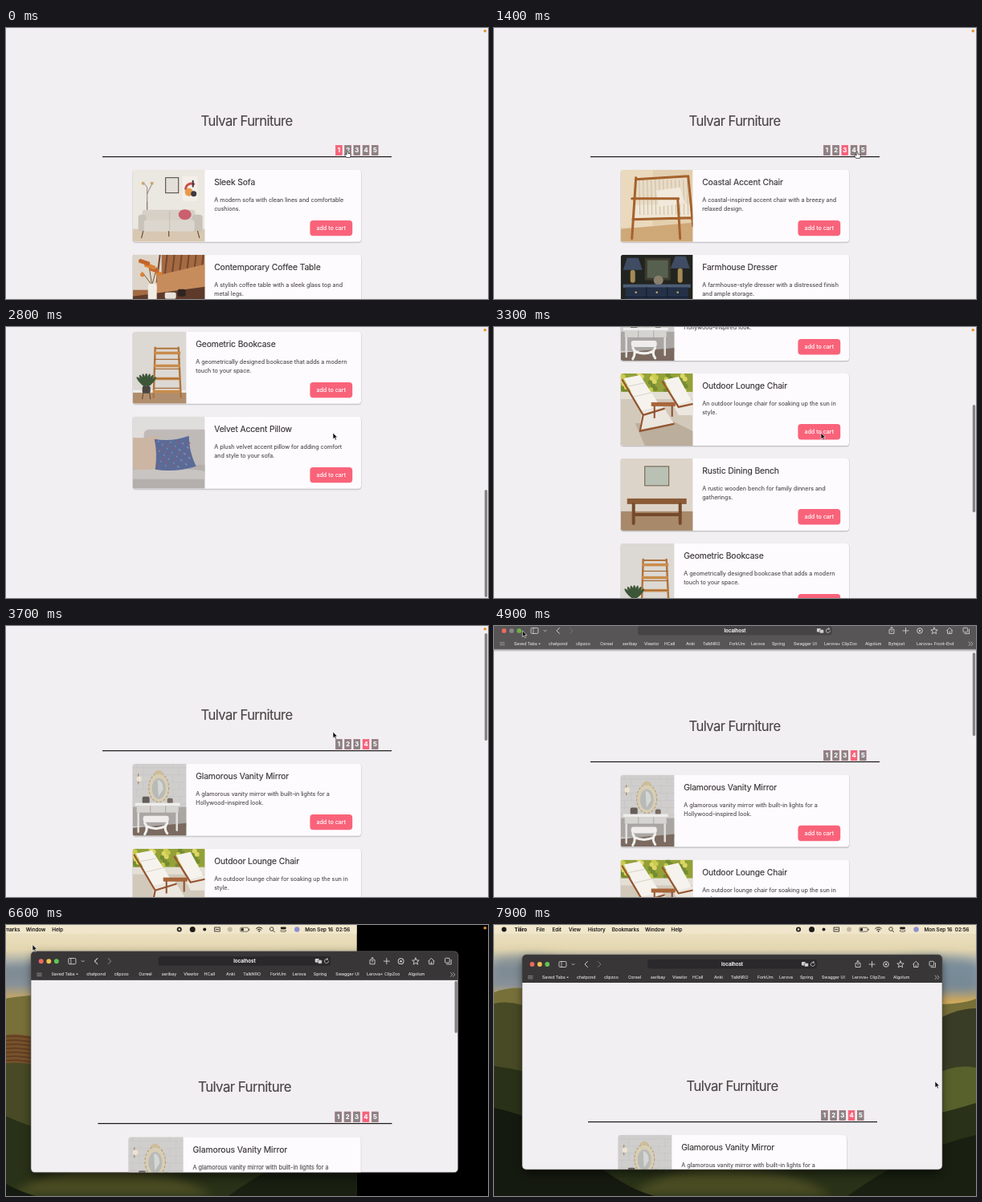
Animation of 600 by 338 pixels, one loop 8 s. Source, as an HTML page:

```html
<!DOCTYPE html>
<html lang="en">
<head>
<meta charset="utf-8">
<title>Furniture shop</title>
<style>
html, body { margin: 0; width: 100%; height: 100%; overflow: hidden; background: #000; }
svg { display: block; width: 100%; height: 100%; font-family: Inter, Roboto, "Open Sans", sans-serif; }
</style>
</head>
<body>
<svg id="stage" viewBox="0 0 600 338"></svg>
<script>
const LOOP = 8000;

const rect = (x, y, w, h, fill, more = '') =>
  `<rect x="${x}" y="${y}" width="${w}" height="${h}" fill="${fill}" ${more}/>`;
const disc = (x, y, r, fill, more = '') => `<circle cx="${x}" cy="${y}" r="${r}" fill="${fill}" ${more}/>`;
const oval = (x, y, rx, ry, fill, more = '') =>
  `<ellipse cx="${x}" cy="${y}" rx="${rx}" ry="${ry}" fill="${fill}" ${more}/>`;
const shape = (d, fill, more = '') => `<path d="${d}" fill="${fill}" ${more}/>`;
const line = (d, color, width = 1) =>
  `<path d="${d}" fill="none" stroke="${color}" stroke-width="${width}" stroke-linecap="round" stroke-linejoin="round"/>`;
// A hairline stroke gives the text its slightly heavy rendering
const text = (x, y, size, str, fill, more = '') =>
  `<text x="${x}" y="${y}" font-size="${size}" fill="${fill}" stroke="${fill}" stroke-width=".14" ${more}>${str}</text>`;
const group = (inner, more = '') => `<g ${more}>${inner}</g>`;
const at = (x, y, inner) => group(inner, `transform="translate(${x} ${y})"`);
const repeat = (n, fn) => Array.from({ length: n }, (_, i) => fn(i)).join('');

// Product pictures, drawn in a 90 (or 67) by 90 box
const art = {
  sofa: () => rect(0, 0, 90, 90, '#ebe7e1') + rect(0, 74, 90, 16, '#d8c8b2') +
    rect(41, 10, 16, 19, '#e4dfd8', 'stroke="#45403d"') +
    rect(62, 8, 19, 31, '#f4efe8') + line('M66 24a7 7 0 0 1 10-6', '#c9524f', 3) +
    disc(70, 28, 5, '#e59a4b') + disc(76, 30, 3.5, '#3d3a41') + line('M75 14v7', '#3d3a41', 2) +
    line('M18 74V22l-4-5M18 30l7-14M18 74V40', '#7a6d60', .8) + disc(13, 17, 2, '#c9a870') + disc(24, 17, 2, '#c9a870') +
    rect(12, 50, 66, 18, '#d6d0c6', 'rx="4"') + rect(7, 56, 10, 21, '#c8c2b8', 'rx="4"') +
    rect(74, 56, 13, 21, '#c8c2b8', 'rx="4"') + rect(14, 63, 63, 14, '#dcd7ce', 'rx="3"') +
    line('M46 52v23', '#bbb4aa', .7) + oval(65, 56, 8, 6.5, '#cc5f6d') +
    line('M13 77l-2 8M81 77l2 8M45 77v6', '#6b4d36', 1.2),
  coffee: () => rect(0, 0, 90, 90, '#a36a43') + rect(0, 0, 36, 44, '#ddd5ca') +
    repeat(7, i => line(`M${34 + i * 9} 0l-4 34`, '#774629', 2)) + shape('M30 26L90 12V42L30 48z', '#c78c5c') +
    shape('M0 52L90 40V90H0z', '#5d3a2a') + line('M24 38L20 12M24 38l6-22M24 38l-12-16', '#7b5a32', 1) +
    repeat(14, i => disc(10 + i * 7 % 25, 8 + i * 5 % 19, 2.6, i % 2 ? '#d98235' : '#c4652a')) +
    rect(19, 36, 11, 22, '#f0ece6', 'rx="4"') + rect(40, 47, 14, 8, '#e8e2da', 'rx="2"') +
    rect(56, 43, 10, 9, '#2e2422', 'rx="2"'),
  chair: () => rect(0, 0, 90, 90, '#e3cfaf') + rect(0, 0, 40, 72, '#ead9bd') + shape('M0 74L90 66V90H0z', '#cfa878') +
    shape('M20 14L84 10 86 50 24 52z', '#e8dcc8') + shape('M18 44L86 42 88 58 18 60z', '#efe6d6') +
    repeat(13, i => line(`M${23 + i * 5} 13l1 43`, '#c7b493', .8)) + shape('M44 26l30-4 6 20-32 4z', '#f1e9db') +
    line('M14 86L19 10M14 36H72M71 36L74 86M15 62L90 60M19 12L84 8M84 8L90 70', '#a5622d', 3),
  dresser: () => rect(0, 0, 90, 90, '#22241f') + rect(30, 4, 32, 28, '#3c3a2e') + rect(33, 7, 26, 22, '#57604f') +
    shape('M8 4h14l5 15H3zM68 2h13l5 15H62z', '#3f4c63') + rect(12, 19, 6, 16, '#a58a55', 'rx="3"') +
    rect(71, 17, 6, 18, '#a58a55', 'rx="3"') + disc(47, 32, 6, '#8a7e6c') + rect(3, 37, 84, 4, '#4d5d78') +
    rect(6, 41, 78, 49, '#243147') + line('M6 53H84M32 41v12M58 41v12', '#121a2a', 1) +
    [19, 45, 71].map(x => disc(x, 47, 1.3, '#c4a767')).join(''),
  mirror: () => rect(0, 0, 67, 90, '#cfcecd') + rect(0, 54, 67, 24, '#aaa6a3') + shape('M0 80L67 74V90H0z', '#7b6a60') +
    repeat(6, i => line(`M0 ${5 + i * 9}H67M${5 + i % 2 * 8} ${5 + i * 9}v-9M${50 + i % 2 * 8} ${5 + i * 9}v-9`, '#c3c1c0', .5)) +
    oval(32.5, 30, 12.5, 18, '#d8cdb4') + oval(32.5, 30, 12.5, 18, 'none', 'stroke="#b3a27c" stroke-width="1.2" stroke-dasharray="3 2"') +
    oval(32.5, 31, 8.5, 13, '#b8bab7') + shape('M31 20q7 2 7 12l-6 9z', '#d5d7d5') + shape('M26 13q6-10 13 0z', '#cdbd98') +
    line('M7 13v12', '#a5865c', 1.2) + disc(8, 19, 3.2, '#eee3d0') +
    rect(12, 41, 9, 9, '#655d58', 'rx="2"') + rect(43, 43, 7, 7, '#776a61', 'rx="2"') +
    rect(3, 49, 56, 3.5, '#eeedec') + rect(5, 52.5, 52, 9, '#d6d4d1') +
    line('M22 53v8M41 53v8M5 61.5H57', '#9c9895', .7) + line('M7 62v23M55 62v21', '#e3e1de', 2.5) +
    rect(13, 65, 32, 8, '#eeedeb', 'rx="3"') + line('M15 74q5 6 0 14M43 74q-5 6 0 13M17 78q12 6 24 0', '#f1f0ee', 3),
  lounge: () => rect(0, 0, 90, 90, '#d2c9bb') + rect(0, 0, 90, 24, '#93a138') +
    repeat(40, i => disc(i * 37 % 92, i * 11 % 23, 3, ['#c9cb4c', '#748c30', '#dcd566'][i % 3])) +
    rect(0, 23, 90, 9, '#e4dfd5') + shape('M18 62L66 60 90 72V90H30z', '#bcae9c') +
    shape('M4 6L24 2 50 42 26 48z', '#f6f3ee') + shape('M26 46L52 40 66 62 24 70z', '#ebe6de') +
    line('M10 16L29 12M17 29L38 24', '#cfc8be', .8) +
    shape('M54 8L72 4 88 34 72 40z', '#f6f3ee') + shape('M66 40L90 33V52L72 52z', '#ebe6de') +
    line('M2 8L28 52 24 72 66 63M28 52L54 44M52 10L72 42 90 38', '#95552f', 2.2) +
    rect(38, 36, 30, 5, '#a8653a') + line('M42 41v14M64 41v12', '#8d4e2b', 2),
  bench: () => rect(0, 0, 90, 90, '#ddd4c9') + rect(0, 66, 90, 24, '#a88a6b') + rect(30, 10, 30, 24, '#b9c0b4', 'stroke="#6e5c4a"') +
    rect(8, 50, 74, 7, '#8a5b36') + line('M16 57v24M74 57v24M16 70H74', '#754a2b', 4),
  bookcase: () => rect(0, 0, 67, 90, '#dcd8d4') + rect(0, 76, 67, 14, '#b08e6d') + rect(0, 73, 67, 3, '#efedea') +
    line('M28 20L26 82M57 20L60 82', '#b0743b', 2.4) + line('M28 21H57', '#b0743b', 2) +
    repeat(4, i => rect(26.5 - i * .4, 25 + i * 16, 33, 3.5, '#c98c4a') + rect(27, 34 + i * 12, 32, 1.2, '#a76a35')) +
    repeat(7, i => oval(17, 60, 2, 8, '#3d5638', `transform="rotate(${-42 + i * 14} 17 70)"`)) +
    rect(12, 68, 10, 9, '#4a4541', 'rx="2"') + line('M13 77l-1 7M21 77l1 7', '#6e4f35', 1.2),
  pillow: () => rect(0, 0, 90, 90, '#e0dedd') + rect(14, 16, 80, 54, '#bfbab8', 'rx="6"') + rect(0, 60, 90, 30, '#b4afad') +
    shape('M0 66Q50 62 90 68V78H0z', '#c8c4c1') + shape('M0 26Q18 28 32 23Q29 44 36 64Q16 68 0 65z', '#cdb5a4') +
    shape('M27 28Q48 32 70 24Q70 44 79 62Q54 70 28 66Q31 46 27 28z', '#596b98') +
    repeat(90, i => disc(32 + i * 13 % 41, 31 + i * 7 % 34, .9, i % 3 ? '#8a5d74' : '#7e8fb4')),
  lamp: () => rect(0, 0, 67, 90, '#cfcac4') + rect(0, 74, 67, 16, '#8b6d54') +
    shape('M24 14h20l5 16H19z', '#3b3836') + line('M34 30V78M24 80H44', '#3b3836', 2.4)
};

const wide = 90, tall = 67;
const pages = {
  1: [['Sleek Sofa', 'A modern sofa with clean lines and comfortable', 'cushions.', 'sofa', wide],
    ['Contemporary Coffee Table', 'A stylish coffee table with a sleek glass top and', 'metal legs.', 'coffee', wide]],
  2: [['Minimalist Bookshelf', 'A minimalist bookshelf with open shelves for', 'your favorite books.', 'bookcase', tall],
    ['Industrial Floor Lamp', 'An industrial floor lamp with a metal shade and', 'adjustable height.', 'lamp', tall]],
  3: [['Coastal Accent Chair', 'A coastal-inspired accent chair with a breezy and', 'relaxed design.', 'chair', wide],
    ['Farmhouse Dresser', 'A farmhouse-style dresser with a distressed finish', 'and ample storage.', 'dresser', wide]],
  4: [['Glamorous Vanity Mirror', 'A glamorous vanity mirror with built-in lights for a', 'Hollywood-inspired look.', 'mirror', tall],
    ['Outdoor Lounge Chair', 'An outdoor lounge chair for soaking up the sun in', 'style.', 'lounge', wide],
    ['Rustic Dining Bench', 'A rustic wooden bench for family dinners and', 'gatherings.', 'bench', wide],
    ['Geometric Bookcase', 'A geometrically designed bookcase that adds a modern', 'touch to your space.', 'bookcase', tall],
    ['Velvet Accent Pillow', 'A plush velvet accent pillow for adding comfort', 'and style to your sofa.', 'pillow', wide]]
};

function card([name, first, second, picture, width], i) {
  const x = width + 11.5;
  return at(157.7, 176.7 + i * 106,
    rect(-.6, .2, 285.5, 91.6, '#000', 'rx="4" opacity=".09"') + rect(-.2, .1, 284.7, 90.8, '#000', 'rx="4" opacity=".16"') +
    rect(0, 0, 284.3, 90, '#fdfbfe', 'rx="3.5"') + group(art[picture](), `clip-path="url(#photo${width})"`) +
    text(x, 19.1, 10.3, name, '#383334', 'letter-spacing="-.1"') +
    text(x, 40.1, 7.15, first, '#565152') + text(x, 51.2, 7.15, second, '#565152') +
    rect(220.7, 63.2, 52.8, 19.4, '#f9637a', 'rx="4"') +
    text(247, 75.6, 7.15, 'add to cart', '#fff', 'text-anchor="middle"'));
}

function page(n) {
  const pager = repeat(5, i => rect(410.5 + i * 11.22, 146.5, 7.7, 12, i + 1 === n ? '#f9637a' : '#898486',
    `stroke="${i + 1 === n ? '#f2566f' : '#a0666f'}" stroke-width=".7"`) +
    text(414.4 + i * 11.22, 155.3, 7.7, i + 1, '#fff', 'text-anchor="middle" font-weight="700"'));
  return text(299.6, 122.4, 16.6, 'Tulvar Furniture', '#4c4546', 'text-anchor="middle" letter-spacing="-.57"') +
    pager + rect(120, 160, 360, 1.2, '#1c1819') + pages[n].map(card).join('');
}

function menuBar(color, hollow) {
  const items = [['Tiliro', 25.5], ['File', 52.6], ['Edit', 72.5], ['View', 93], ['History', 117], ['Bookmarks', 146.7], ['Window', 188], ['Help', 220.5]];
  return disc(12.5, 5.6, 3, color) +
    items.map(([s, x], i) => text(x, 8, 6.3, s, color, `font-weight="${i ? 500 : 700}"`)).join('') +
    disc(379, 5.5, 3, color) + rect(377.8, 4.3, 2.4, 2.4, hollow) +
    disc(395.5, 5.5, 3.5, color) + disc(410.5, 5.5, 2, color) +
    rect(423, 3, 6.5, 5, 'none', `stroke="${color}" stroke-width=".8"`) + line('M424.5 5.5h3.5', color, .8) +
    disc(442, 5.5, 3, color, 'opacity=".22"') +
    rect(455, 3.2, 10, 5, 'none', `rx="1.3" stroke="${color}" stroke-width=".6"`) + rect(456, 4.2, 3, 3, color) + rect(465.7, 4.7, .8, 2, color) +
    line('M474.8 4.3q3.7-3 7.4 0M476.2 6q2.3-1.8 4.6 0', color, 1) + disc(478.5, 7.7, .9, color) +
    disc(494, 5, 2.3, 'none', `stroke="${color}" stroke-width=".8"`) + line('M495.7 6.8l2 2', color, .8) +
    rect(505, 2.5, 7, 2.6, color, 'rx="1.3"') + rect(505.3, 6, 6.4, 2.3, 'none', `rx="1.2" stroke="${color}" stroke-width=".6"`) +
    disc(525.5, 5.5, 3.2, '#8d8fd0') +
    text(591.5, 8, 6.3, 'Mon Sep 16&#160; 02:56', color, 'text-anchor="end" font-weight="500"');
}

const bookmarks = [['Saved Tabs ▪', 25], ['chatpond', 68], ['clipzoo', 102], ['Ozreel', 132], ['seribay', 160], ['Viewlor', 187],
  ['HCall', 212], ['Anki', 239], ['TalkNRO', 260], ['ForkUm', 293], ['Lerova', 320], ['Spring', 346], ['Swagger UI', 373],
  ['Lerova+ ClipZoo', 411], ['Algolum', 462], ['Bytejost', 491], ['Lerova+ Front-End', 526]];

function toolbar(w, { lights, base, well }) {
  const ink = '#d2cfd1', field = w * .403, right = w - 105;
  return rect(0, 0, w, 35, base) +
    lights.map((c, i) => disc(12.5 + i * 9.4, 12, 2.9, c)).join('') +
    rect(46, 8.5, 9, 7, 'none', `rx="1.2" stroke="${ink}" stroke-width=".9"`) + line('M49 8.5v7', ink, .8) +
    line('M62 11.3l1.6 1.6 1.6-1.6', ink, .8) + line('M81.5 8.5l-3.5 3.5 3.5 3.5', ink, 1) + line('M94.5 8.5l3.5 3.5-3.5 3.5', '#787577', 1) +
    rect((w - field) / 2, 6, field, 11.5, well, 'rx="3"') +
    text(w / 2, 14.1, 6.1, 'localhost', '#f2f0f1', 'text-anchor="middle" font-weight="600"') +
    at(w / 2 + field / 2, 0, rect(-19, 9, 5, 4.5, ink, 'rx="1"') + rect(-15.5, 10.5, 5, 4.5, ink, `rx="1" stroke="${well}" stroke-width=".5"`) +
      line('M-2.5 12a2.5 2.5 0 1 1-1.2-2.2M-4.3 8.3l1 1.5-1.6.7', ink, .8)) +
    at(right, 12, line('M-1.5-1.5h-1.5v5h6v-5h-1.5M0 1v-5.5M-1.5-3l1.5-1.5 1.5 1.5M14 0h7M17.5-3.5v7', ink, .9) +
      disc(35, 0, 3.3, 'none', `stroke="${ink}" stroke-width="1"`) + disc(35, 0, 1.2, ink) +
      line('M53-4l1.2 2.8 3 .2-2.3 1.9.8 3-2.7-1.7-2.7 1.7.8-3-2.3-1.9 3-.2zM68.5 0l3.7-3.7 3.7 3.7M69.5-.5v4h5.4v-4M72.2 3.5v-2.5', ink, .9) +
      rect(89, -3.7, 5.6, 5.6, 'none', `rx="1" stroke="${ink}" stroke-width=".9"`) + line('M91 3.7h5.5v-5.5', ink, .9)) +
    line('M7.5 26.5h5.5M7.5 28.2h5.5M7.5 29.9h5.5', '#a19da0', .7) +
    bookmarks.filter(([, x]) => x < w - 55).map(([s, x]) => text(x, 29.7, 5.25, s, '#d2cfd1')).join('') +
    line(`M${w - 9} 26l2 2.3-2 2.3M${w - 6} 26l2 2.3-2 2.3`, ink, .7);
}

const wallpaper = rect(0, 0, 600, 338, 'url(#sky)') +
  group(shape('M0 42Q40 32 90 44T200 46V70H0z', '#76828a', 'opacity=".6"') + shape('M500 44Q560 34 600 46V84H500z', '#718594', 'opacity=".7"'), 'filter="url(#soft)"') +
  shape('M0 84Q30 72 70 86T160 92T300 86T480 96T600 92V338H0z', '#777039') +
  shape('M0 98Q30 92 60 112T200 140V338H0z', '#474a25') +
  shape('M150 140Q180 130 215 146V178Q180 168 150 174z', '#75512b') + repeat(7, i => line(`M150 ${142 + i * 5}q22-8 60 2`, '#53301d', 1)) +
  shape('M600 104Q570 104 540 126V338H600z', '#3a3d25') + shape('M600 178Q570 172 540 192V260H600z', '#58612b') +
  shape('M0 176Q70 184 140 226T300 262T460 250T600 222V338H0z', '#293218') +
  shape('M170 338Q220 296 300 302T420 338z', '#4a4c20', 'filter="url(#soft)"') +
  shape('M0 228Q60 240 110 284T200 338H0z', '#151a10') + shape('M600 262Q520 280 440 338H600z', '#192011') +
  rect(0, 0, 600, 11, '#f3ead2', 'opacity=".6"');

const fullTheme = { lights: ['#ec6a5e', '#8a8688', '#6fb043'], base: '#575556', well: '#464445' };
const windowTheme = { lights: ['#ec6a5e', '#f4bf4f', '#61c554'], base: '#383637', well: '#2a282a' };
const paper = '#f1eff2';
const stage = document.getElementById('stage');
stage.innerHTML = `<defs>
  <clipPath id="photo90"><path d="M90 0V90H3.5Q0 90 0 86.5V3.5Q0 0 3.5 0z"/></clipPath>
  <clipPath id="photo67"><path d="M67 0V90H3.5Q0 90 0 86.5V3.5Q0 0 3.5 0z"/></clipPath>
  <clipPath id="frame"><rect x="35" y="37" width="523" height="268" rx="5"/></clipPath>
  <filter id="soft" x="-20%" y="-50%" width="140%" height="200%"><feGaussianBlur stdDeviation="6"/></filter>
  <linearGradient id="shade" x2="0" y2="1"><stop stop-opacity=".35"/><stop offset="1" stop-opacity="0"/></linearGradient>
  <linearGradient id="sky" x2="0" y2="1"><stop stop-color="#efe5c6"/><stop offset=".09" stop-color="#e3d6b0"/>
  <stop offset=".16" stop-color="#8f9ca6"/><stop offset=".22" stop-color="#8b949a"/><stop offset=".28" stop-color="#cfa95c"/></linearGradient></defs>` +
  rect(0, 0, 600, 338, '#000') +
  group(wallpaper + menuBar('#1d1a17', '#e9e0c6'), 'id="desk"') +
  group(rect(0, 0, 600, 338, paper) +
    group([1, 2, 3, 4].map(n => group(page(n), `id="page${n}"`)).join(''), 'id="scroller"') +
    rect(595.8, 7, 3.4, 134, '#858284', 'id="thumb" rx="1.7"') +
    group(rect(0, 0, 600, 11.6, '#000') + menuBar('#f3f1f2', '#000') + at(0, 11.2, toolbar(600, fullTheme)) +
      rect(0, 46.2, 600, 3.5, 'url(#shade)'), 'id="bar"'), 'id="full"') +
  group(rect(36, 42, 521, 268, '#000', 'rx="7" opacity=".55" filter="url(#soft)"') +
    group(rect(35, 37, 523, 268, paper) + at(-3, 85, page(4)) +
      rect(553.8, 73, 3.3, 63, '#858284', 'id="winThumb" rx="1.6"') + at(35, 37, toolbar(523, windowTheme)), 'clip-path="url(#frame)"') +
    rect(35, 37, 523, 268, 'none', 'rx="5" stroke="#5c595a" stroke-width=".6"'), 'id="win"') +
  disc(596.3, 3.7, 1.8, '#e8912d', 'id="dot"') +
  shape('M0 0V7.8L1.8 6.2 3 9 4.4 8.4 3.2 5.7H5.6z', '#111', 'id="arrow" stroke="#fff" stroke-width=".6"') +
  shape('M-.9.8Q0-.7.9.8V3.2L3.8 4Q4.5 4.4 4.2 6L3.5 8.5H-1.4L-3.2 5.4Q-3 4-2 4.2L-.9 5z', '#fff', 'id="hand" stroke="#222" stroke-width=".7"');

const el = id => document.getElementById(id);
const set = (id, name, value) => el(id).setAttribute(name, value);
const show = (id, on) => set(id, 'opacity', +on);
const clamp = v => Math.max(0, Math.min(1, v));
const ramp = (t, a, b) => clamp((t - a) / (b - a));
const smooth = u => u * u * (3 - 2 * u);

// Keys are [time, ...values]; values ease between neighbouring keys
function track(keys, t) {
  const i = keys.findIndex(k => k[0] > t);
  if (i < 0) return keys[keys.length - 1].slice(1);
  if (i === 0) return keys[0].slice(1);
  const a = keys[i - 1], b = keys[i], u = smooth(ramp(t, a[0], b[0]));
  return a.slice(1).map((v, j) => v + (b[j + 1] - v) * u);
}

const pointerKeys = [[0, 425, 153], [450, 425, 153], [750, 436, 153], [1050, 436, 153], [1400, 452, 154], [1600, 448, 152],
  [1720, 448, 152], [1980, 407, 132], [3750, 407, 132], [4450, 84, 42], [4780, 36, 1], [5200, 33, 24.5], [6900, 33, 24.5], [7550, 549, 195]];
const scrollKeys = [[1900, 0], [2650, 489], [2850, 489], [3700, 5], [3850, 0]];

function draw(t) {
  const [x, y] = track(pointerKeys, t);
  const [scroll] = track(scrollKeys, t);
  const current = t < 400 ? 1 : t < 1000 ? 2 : t < 1680 ? 3 : 4;
  const drop = smooth(ramp(t, 4750, 5000));
  const left = 1 - ramp(t, 6100, 7000);

  for (let n = 1; n <= 4; n++) set('page' + n, 'display', n === current ? 'inline' : 'none');
  set('scroller', 'transform', `translate(0 ${13.5 * drop - scroll})`);
  set('bar', 'transform', `translate(0 ${-50 * (1 - drop)})`);
  set('thumb', 'y', 7 + 40 * drop + scroll * 196 / 489);
  set('thumb', 'height', 134 - 46 * drop);
  show('thumb', t >= 4750 || t >= 1900 && t < 4400);

  const rest = left ** 2.67;
  set('desk', 'transform', `translate(${-600 * left ** 1.6} 0)`);
  set('win', 'transform', `translate(${296.5 + 3.5 * rest} ${171 - 2 * rest}) scale(${1 + 77 / 523 * rest} ${1 + 70 / 268 * rest}) translate(-296.5 -171)`);
  set('win', 'opacity', ramp(t, 6080, 6180));
  set('full', 'display', t < 6180 ? 'inline' : 'none');
  set('winThumb', 'opacity', 1 - ramp(t, 6900, 7100));
  show('dot', drop < .5 || t > 6180 && left > .01);

  const overPager = t < 1900 && y > 145;
  for (const id of ['arrow', 'hand']) set(id, 'transform', `translate(${x} ${y})`);
  show('hand', overPager);
  show('arrow', !overPager);
}

function tick() {
  draw(performance.now() % LOOP);
  requestAnimationFrame(tick);
}
tick();
</script>
</body>
</html>
```
